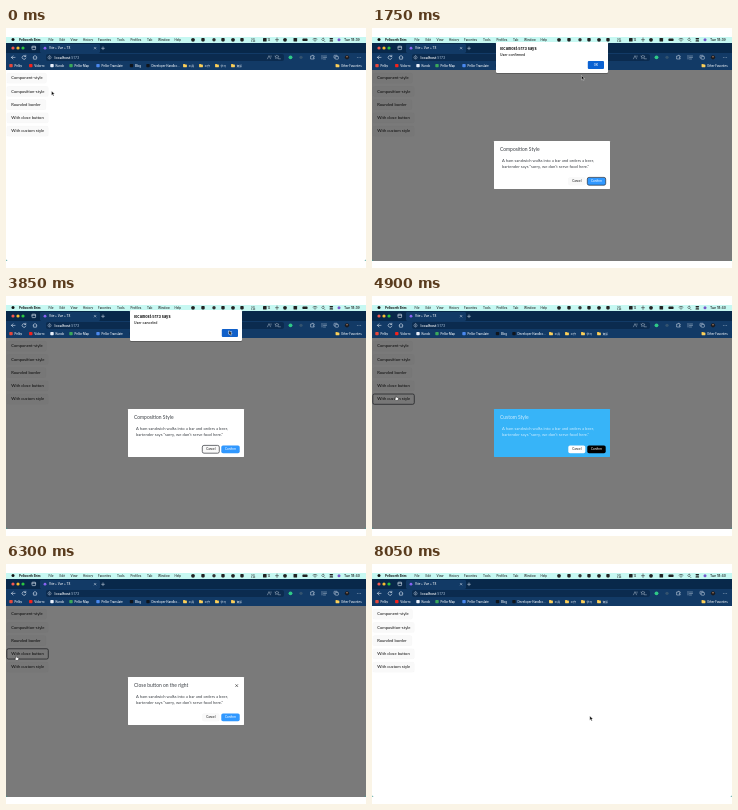
Animation, 360 px wide and 240 px high, one loop 8400 ms. Source, as an HTML page:

```html
<!DOCTYPE html>
<html lang="en">
<head>
<meta charset="utf-8">
<title>Modal demo</title>
<style>
html, body { margin: 0; width: 100%; height: 100%; overflow: hidden; background: #fff; }
svg { display: block; width: 360px; height: 240px; }
text { font-family: Inter, "Noto Sans CJK SC", "Noto Sans CJK", sans-serif; font-weight: 500; white-space: pre; }
.page { font-family: Lato, sans-serif; font-weight: 400; }
</style>
</head>
<body>
<svg id="stage" viewBox="0 0 360 240" xmlns="http://www.w3.org/2000/svg"></svg>
<script>
const NS = 'http://www.w3.org/2000/svg';
const stage = document.getElementById('stage');

function el(parent, tag, attrs = {}, content) {
  const node = document.createElementNS(NS, tag);
  for (const key in attrs) node.setAttribute(key, attrs[key]);
  if (content !== undefined) node.textContent = content;
  parent.appendChild(node);
  return node;
}
const group = (parent = stage) => el(parent, 'g');
const rect = (p, x, y, width, height, fill, rx = 0, more = {}) =>
  el(p, 'rect', { x, y, width, height, fill, rx, ...more });
const dot = (p, cx, cy, r, fill) => el(p, 'circle', { cx, cy, r, fill });
const line = (p, d, stroke, width = 0.6) =>
  el(p, 'path', { d, stroke, fill: 'none', 'stroke-width': width, 'stroke-linecap': 'round', 'stroke-linejoin': 'round' });
const label = (p, x, y, size, fill, str, more = {}) =>
  el(p, 'text', { x, y, 'font-size': size, fill, ...more }, str);
const show = (node, on) => node.setAttribute('visibility', on ? 'inherit' : 'hidden');
const page = { class: 'page' };

// Menu bar
function menuBar() {
  const g = group();
  rect(g, 0, 9, 360, 6, '#c6f8f2');
  dot(g, 7, 11.6, 1.5, '#111');
  label(g, 13, 12.8, 3, '#111', 'Pellworth Brim', { style: 'font-weight:700' });
  const items = { File: 42.5, Edit: 53.5, View: 64.5, History: 77, Favorites: 92, Tools: 111, Profiles: 124.5, Tab: 141, Window: 152, Help: 168.5 };
  for (const name in items) label(g, items[name], 12.8, 3, '#222', name);
  [187, 227, 279].forEach(x => dot(g, x, 11.8, 1.9, '#222'));
  [197, 217, 236].forEach(x => rect(g, x - 1.7, 10, 3.4, 3.4, '#222', 0.8));
  dot(g, 208, 11.8, 1.7, '#333');
  label(g, 245, 11.5, 1.9, '#222', '1.2K');
  label(g, 245, 13.7, 1.9, '#222', '0.8K');
  rect(g, 257, 9.9, 3.6, 3.7, '#222', 0.6);
  label(g, 261.4, 12.9, 2.8, '#222', '12');
  line(g, 'M271 10v3.4M269.5 11.7h3', '#333');
  rect(g, 287.5, 9.9, 3.6, 3.7, '#222', 0.7);
  rect(g, 296.5, 10.6, 5, 2.4, '#222', 0.6);
  line(g, 'M307 11q2-1.6 4 0M308 12.2q1-.8 2 0', '#222');
  dot(g, 309, 13.3, 0.4, '#222');
  line(g, 'M317 10.2h0a1.2 1.2 0 1 1-.1 0M318 12.7l1 1', '#222', 0.5);
  rect(g, 323.5, 10.1, 3.6, 1.4, '#222', 0.7);
  rect(g, 323.5, 12.2, 3.6, 1.4, '#222', 0.7);
  dot(g, 333, 11.8, 1.5, '#7656c8');
  return label(g, 338, 12.8, 3.4, '#111', '');
}

// Browser window frame
function browser() {
  const g = group(), ink = '#d9e3ee', bar = '#123a66';
  rect(g, 0, 15, 360, 10, '#08284a');
  rect(g, 0, 25, 360, 17, bar);
  rect(g, 34, 16, 60, 9, bar, 1.4);
  ['#f4584f', '#f6bd30', '#2bc640'].forEach((c, i) => dot(g, 7 + i * 5, 20, 1.6, c));
  rect(g, 26, 18.2, 3.6, 3.4, 'none', 0.5, { stroke: ink, 'stroke-width': 0.6 });
  line(g, 'M26 19.2h3.6', ink);
  dot(g, 39, 20.2, 1.4, '#8a63f4');
  label(g, 43, 21.4, 2.85, '#fff', 'Vite + Vue + TS');
  line(g, 'M88.3 19.4l1.6 1.6M89.9 19.4l-1.6 1.6M97 18.9v2.8M95.6 20.3h2.8', ink, 0.5);

  line(g, 'M9 29.4H5.4l1.6-1.6M5.4 29.4l1.6 1.6', ink);
  line(g, 'M19.6 28.3a1.9 1.9 0 1 0 .3 1.7M19.8 27.2v1.3h-1.3', ink);
  line(g, 'M27 29.3l2-1.9 2 1.9M27.6 29v2.2h2.8V29', ink);
  rect(g, 40, 26, 238, 7, '#0b2b4f', 2);
  line(g, 'M43.5 27.8a1.6 1.6 0 1 0 .1 0M43.6 29.3v.9', ink, 0.45);
  const url = label(g, 48.6, 30.6, 3.6, '#fff', 'localhost');
  el(url, 'tspan', { fill: '#8fa6bf' }, ':5173');
  line(g, 'M261.5 30.8l1.5-3.2 1.5 3.2M265 27.8v1.2', ink, 0.4);
  line(g, 'M270 28l.9-.8.9.8 1 .2-.7 1 .2 1.2-1.4-.5-1.3.5.2-1.2-.7-1zM272.6 30.8h1.8', ink, 0.4);
  dot(g, 284.5, 29.3, 1.9, '#2fc987');
  dot(g, 295, 29.3, 1.6, '#34536f');
  line(g, 'M305 28h1.2v-.7h1V28h1v1.2h-.8v1h.8V31h-3.2z', ink, 0.5);
  line(g, 'M316 27.4v3.6M317.5 28h3M317.5 29.5h3M317.5 31h2', ink, 0.4);
  rect(g, 328, 27.3, 3.2, 2.8, 'none', 0.5, { stroke: ink, 'stroke-width': 0.5 });
  rect(g, 329.2, 28.4, 3.2, 2.8, bar, 0.5, { stroke: ink, 'stroke-width': 0.5 });
  dot(g, 341, 29.3, 2.1, '#1a1a1f');
  dot(g, 341, 28.7, 0.8, '#b08468');
  [351.3, 353, 354.7].forEach(x => dot(g, x, 29.3, 0.4, ink));

  const marks = [
    [5, 'Pelby', '#e5483b'], [24.8, 'Vidorro', '#f4221c'], [46, 'Kundo', '#eaf0fb'],
    [65, 'Pellor Map', '#3aa85a'], [92, 'Pellor Translate', '#4a88ee'],
    [125.5, 'Blog', '#10151c'], [142, 'Developer Handbo…', '#10151c']
  ];
  for (const [x, name, fill] of marks) {
    rect(g, x - 1.7, 36, 3.4, 3.2, fill, 0.7);
    label(g, x + 3.4, 38.7, 2.9, '#f2f6fa', name);
  }
  const folder = (x, name) => {
    rect(g, x - 1.9, 36, 2, 1.2, '#e9b53a', 0.3);
    rect(g, x - 1.9, 36.5, 3.8, 2.7, '#fbd05c', 0.4);
    label(g, x + 3.4, 38.7, 2.85, '#f2f6fa', name);
  };
  ['工具', '工作', '学习', '資訊'].forEach((name, i) => folder(179 + i * 16, name));
  folder(331.5, 'Other Favorites');
}

// Page buttons
function pageButtons() {
  const names = ['Component-style', 'Composition-style', 'Rounded border', 'With close button', 'With custom style'];
  const ends = [40.5, 42.3, 40, 42.3, 42.3];
  const g = group();
  return names.map((name, i) => {
    const y = 45 + i * 13.25;
    const box = rect(g, 0.8, y, ends[i] - 0.8, 10.3, '#f9f9f9', 1.6);
    label(g, 5.2, y + 6.4, 4.15, '#111', name, page);
    return box;
  });
}

const JOKE = ['A ham sandwich walks into a bar and orders a beer,', 'bartender says "sorry, we don\'t serve food here."'];

function modal({ title, custom, close }) {
  const g = group();
  const ink = custom ? '#cdecfe' : '#3c4046';
  rect(g, 122, 113, 116, 48, custom ? '#37b4f8' : '#fff', 0.4);
  label(g, 128, 123.1, 4.95, ink, title, page);
  JOKE.forEach((str, i) => label(g, 130, 133.6 + i * 6, 4.13, ink, str, page));
  if (close) line(g, 'M229.7 120.6l2 2M231.7 120.6l-2 2', '#222', 0.6);
  const button = (x, width, fill, color, name) => {
    const box = rect(g, x, 149.4, width, 7.8, fill, 1.7);
    label(g, x + width / 2, 154.4, 3.1, color, name, { ...page, 'text-anchor': 'middle' });
    return box;
  };
  const cancel = button(196.3, 17, custom ? '#fff' : '#f9f9f9', '#111', 'Cancel');
  const confirm = button(215.3, 18.4, custom ? '#000' : '#3098ff', '#fff', 'Confirm');
  return { g, cancel, confirm };
}

function alertBox() {
  const g = group();
  rect(g, 124, 14.3, 112, 31.2, '#000', 1.2, { opacity: 0.25, transform: 'translate(0 .5)' });
  rect(g, 124, 14, 112, 31, '#fff', 1.2);
  label(g, 128, 21.7, 3.8, '#111', 'localhost:5173 says', { style: 'font-weight:700' });
  const message = label(g, 128, 28.3, 3.4, '#111', '');
  const ok = rect(g, 215.8, 33, 16.2, 8, '#0b62d2', 1);
  label(g, 223.9, 38.1, 2.9, '#fff', 'OK', { 'text-anchor': 'middle' });
  return { g, message, ok };
}

function pointers() {
  const g = group();
  const shape = (d, fill, stroke) =>
    el(g, 'path', { d, fill, stroke, 'stroke-width': 0.4, 'stroke-linejoin': 'round' });
  const arrow = shape('M0 0V4.3L1 3.4 1.7 5 2.5 4.7 1.8 3.1H3.1Z', '#000', '#fff');
  const hand = shape('M-.5 .3Q0-.4.5.3V1.8L2.3 2.3Q2.7 2.6 2.5 3.4L2 4.9H-.3L-1.5 3.1Q-1.4 2.4-.5 2.9Z', '#fff', '#000');
  return { g, arrow, hand };
}

const clock = menuBar();
browser();
rect(stage, 0, 42, 360, 191, '#fff');
const buttons = pageButtons();
const shade = rect(stage, 0, 42, 360, 191, '#000', 0, { opacity: 0.52 });
const corner = { fill: '#3f9a92' };
el(stage, 'path', { d: 'M0 231V233H2Q0 233 0 231Z', ...corner });
el(stage, 'path', { d: 'M360 231V233H358Q360 233 360 231Z', ...corner });
const modals = {
  comp: modal({ title: 'Composition Style' }),
  custom: modal({ title: 'Custom Style', custom: true }),
  close: modal({ title: 'Close button on the right', close: true })
};
const alertUi = alertBox();
const pointer = pointers();

// x, y, pointer, modal, focused control, alert message, OK button state
const YES = 'User confirmed', NO = 'User canceled';
const steps = [
  [45.5, 63, 'arrow'],
  [32, 63, 'hand'],
  [32, 63, 'hand', 'comp', 1],
  [170, 128, 'arrow', 'comp'],
  [224, 152, 'hand', 'comp', 'confirm'],
  [209.5, 47.5, 'arrow', 'comp', 'confirm', YES],
  [219, 40, 'arrow', 'comp', 'confirm', YES, 'hover'],
  [222, 35.5, 'arrow', 'comp', 'confirm', YES, 'pressed'],
  [214, 100, 'arrow', 'comp', 'confirm'],
  [206, 152, 'hand', 'comp', 'cancel'],
  [213, 99, 'arrow', 'comp', 'cancel', NO],
  [223, 34.5, 'arrow', 'comp', 'cancel', NO, 'hover'],
  [190, 55, 'arrow'],
  [24, 99.5, 'hand'],
  [24, 99.5, 'hand', 'custom', 4],
  [160, 138, 'arrow', 'custom', 4],
  [224.8, 151.5, 'hand', 'custom', 4],
  [130, 128, 'arrow'],
  [10.2, 91.5, 'hand', 'close', 3],
  [190, 126, 'arrow', 'close', 3],
  [230, 121, 'hand', 'close', 3],
  [226, 140, 'arrow', 'close', 3],
  [218, 152, 'hand', 'close', 3],
  [217.8, 152, 'arrow']
];
const STEP = 350;
const okFill = { hover: '#1160c9', pressed: '#0a4ca8' };

function ring(box, on) {
  box.setAttribute('stroke', on ? '#22262c' : 'rgba(0,0,0,.05)');
  box.setAttribute('stroke-width', on ? 0.65 : 0.3);
}

function render(i) {
  const [x, y, kind, open, focus, message, okState] = steps[i];
  clock.textContent = i < 14 ? 'Tue 18:39' : 'Tue 18:40';
  show(shade, open);
  buttons.forEach((box, n) => ring(box, focus === n));
  for (const name in modals) {
    const m = modals[name];
    show(m.g, name === open);
    ring(m.cancel, focus === 'cancel');
    ring(m.confirm, focus === 'confirm');
  }
  show(alertUi.g, message);
  alertUi.message.textContent = message || '';
  alertUi.ok.setAttribute('fill', okFill[okState] || '#0b62d2');
  pointer.g.setAttribute('transform', `translate(${x} ${y})`);
  show(pointer.arrow, kind === 'arrow');
  show(pointer.hand, kind === 'hand');
}

const start = performance.now();
let shown = -1;
function tick() {
  const i = Math.floor((performance.now() - start) / STEP) % steps.length;
  if (i !== shown) render(shown = i);
  requestAnimationFrame(tick);
}
tick();
</script>
</body>
</html>
```
